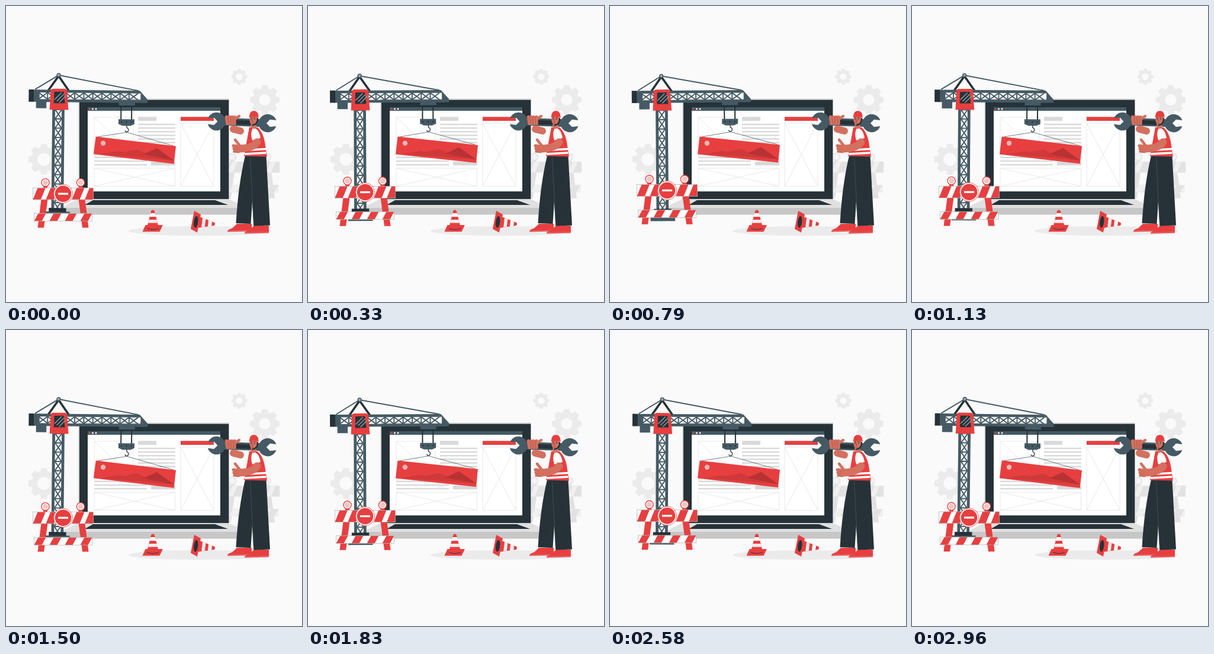
Write an HTML page that moves like this. It is 500x500 px and loops after 3000 ms.

```html
<!DOCTYPE html>
<html lang="en">
<head>
<meta charset="utf-8">
<title>Under construction</title>
<style>
  html, body { margin: 0; width: 100%; height: 100%; overflow: hidden; background: #fafafa; }
  svg { display: block; width: 100vw; height: 100vh; }
</style>
</head>
<body>
<svg id="stage" viewBox="0 0 500 500"></svg>
<script>
const RED = '#e73f40', SLATE = '#455a64', DARK = '#263238', PALE = '#ebebeb',
  GREY = '#d9d9d9', SKIN = '#d4705f', CREASE = '#a84f45', WHITE = '#fff';
const PERIOD = 1500;

// Markup helpers
const rect = (x, y, w, h, fill, extra = '') => `<rect x="${x}" y="${y}" width="${w}" height="${h}" fill="${fill}" ${extra}/>`;
const disc = (x, y, r, fill, extra = '') => `<circle cx="${x}" cy="${y}" r="${r}" fill="${fill}" ${extra}/>`;
const oval = (x, y, rx, ry, fill) => `<ellipse cx="${x}" cy="${y}" rx="${rx}" ry="${ry}" fill="${fill}"/>`;
const shape = (d, fill) => `<path d="${d}" fill="${fill}"/>`;
const line = (d, color, width = 1, cap = 'butt') =>
  `<path d="${d}" fill="none" stroke="${color}" stroke-width="${width}" stroke-linecap="${cap}"/>`;
const limb = (d, width, color = SKIN) => line(d, color, width, 'round');
const repeat = (n, draw) => Array.from({ length: n }, (_, i) => draw(i)).join('');
const place = (transform, content, id = '') => `<g transform="${transform}" id="${id}">${content}</g>`;

function gear(x, y, r, hole) {
  const body = r * 0.8, half = r * 0.2;
  const teeth = repeat(8, i => place(`rotate(${i * 45})`,
    shape(`M${-half * 1.25} ${-r * 0.7}L${-half * 0.9} ${-r}H${half * 0.9}L${half * 1.25} ${-r * 0.7}Z`, PALE)));
  return place(`translate(${x} ${y})`, teeth +
    disc(0, 0, (body + hole) / 2, 'none', `stroke="${PALE}" stroke-width="${body - hole}"`));
}

// Two rails joined by crossed braces
function lattice(bays, bay, depth, rail) {
  const far = depth - rail, length = bays * bay;
  return rect(0, 0, length, rail, SLATE) + rect(0, far, length, rail, SLATE) + repeat(bays, i => {
    const a = i * bay, b = a + bay;
    return line(`M${a} ${rail}V${far}L${b} ${rail}M${a} ${rail}L${b} ${far}`, SLATE, 1.9);
  });
}

function stripedBar(id, w, h, pitch, stripe, slant, base, color, edge) {
  const stripes = repeat(5, i => shape(`M${i * pitch} ${h}l${slant} ${-h}h${stripe}l${-slant} ${h}Z`, color));
  return `<clipPath id="${id}">${rect(0, 0, w, h, base)}</clipPath>` + rect(0, 0, w, h, base) +
    `<g clip-path="url(#${id})">${stripes}</g>` + rect(0, 0, w, h, 'none', `stroke="${edge}" stroke-width=".7"`);
}

function barrier(id, base, color, edge, glow) {
  const leg = shape('M14 19H25L18.5 67.3H8Z', color);
  const lamp = x => rect(x - 3.5, -4, 7, 5, color) + disc(x, -9, 7.3, color) +
    disc(x, -9, 5.9, base) + disc(x, -9, 4.5, glow);
  return leg + place('translate(102) scale(-1 1)', leg) + lamp(21) + lamp(80.5) +
    stripedBar(id + 'Top', 102, 19.8, 21.9, 13.3, 8, base, color, edge) +
    place('translate(2 43)', stripedBar(id + 'Low', 98, 13, 26, 13, 7, base, color, edge));
}

const stopSign = () => disc(51, 10, 16, WHITE, `stroke="${RED}" stroke-width=".8"`) +
  disc(51, 10, 13.8, RED) + rect(42.5, 8.4, 17, 3.2, WHITE);

function backdrop() {
  return gear(394, 119.5, 13.6, 5.6) + gear(437, 158.5, 25, 9.6) + gear(64, 259, 26, 10.8) +
    place('translate(361.5 263) scale(.985 .92)', barrier('far', '#f0f0f0', '#e2e2e2', '#e6e6e6', '#f4f4f4')) +
    oval(328, 380, 121, 8, PALE);
}

function laptop() {
  const crossedBox = (x, y, w, h) =>
    line(`M${x} ${y}h${w}v${h}h${-w}zl${w} ${h}m0 ${-h}l${-w} ${h}`, '#e2e2e2', 0.8);
  const rows = (n, x, y, w) => repeat(n, i => rect(x, y + i * 6.15, w, 2.4, GREY));
  const body = shape('M122 326H376L408 341H92Z', '#e0e0e0') + rect(92, 341, 316, 11.5, '#c7c7c7') +
    rect(122, 156.5, 255, 171, '#d4d8d6') + rect(124, 158.6, 252.3, 167.4, DARK) +
    shape('M147 328H353L375 336H133Z', DARK);
  const screen = rect(138, 171, 224, 142.2, WHITE) + rect(138, 171, 224, 6, SLATE) +
    repeat(3, i => disc(141 + i * 5.5, 174, 1.4, i ? WHITE : RED));
  const page = crossedBox(149, 188, 66, 62) + crossedBox(149, 274, 136.5, 30.5) + crossedBox(295, 198, 56, 106.5) +
    rect(223, 187.3, 31, 6.7, GREY) + rows(6, 223, 198.8, 63) + rows(3, 149, 254.6, 89) +
    rect(245, 263, 41, 6.3, GREY) + rect(295, 187.3, 56, 6.7, RED);
  return body + screen + page;
}

// Tip at the origin, widening downwards
function coneBody() {
  const height = 31, half = y => 2.5 + 8 * y / height;
  const band = (from, to, color) =>
    shape(`M${-half(from)} ${from}H${half(from)}L${half(to)} ${to}H${-half(to)}Z`, color);
  return oval(0, height, half(height), 3, RED) + oval(0, 1, 2.6, 1.5, RED) + band(1, height, RED) +
    band(5, 11, WHITE) + band(16, 21.5, '#f6ecec');
}

function cones() {
  return shape('M235.5 370H265L259.5 381.3H230.5Z', RED) + place('translate(248 345)', coneBody()) +
    line('M238 375.5Q248 379.5 258 375.5', DARK, 0.9) +
    shape('M318 346L329 352L323 382.7L312 376.5Z', RED) +
    place('translate(352.5 368.5) rotate(97)', coneBody() + oval(0, 32, 10, 3.6, DARK));
}

function wrench() {
  const head = shape('M-14.5-5L-4-6.2L2 0L-4 6.2L-14.5 5A15.3 15.3 0 1 0-14.5-5Z', SLATE);
  return place('translate(355.5 195) rotate(2)', rect(10, -6.5, 66, 13, SLATE) +
    rect(22, -3.5, 37, 7.5, DARK, 'rx="2"') + head + place('translate(86.5) rotate(178)', head));
}

function worker() {
  const shoe = shape('M16 0H41V12.5L0 13.5Q-.5 9.5 8 7.5Z', RED) + line('M1 12L41 11', '#f08b8a', 0.6);
  const legs = shape('M404 253H421L413.5 368L388.5 367Q392.5 300 404 253Z', DARK) +
    shape('M411 253H439.5L446 370.5L418.5 371.5Z', DARK) + line('M412.5 256L418.5 371', '#46545b', 0.8);
  const torso = shape('M403 208L413 205L407 229Z', WHITE) +
    shape('M411 205L425 205Q434 213 437 229L441 254.5L402 253.5Z', RED) +
    [241.5, 248].map(y => line(`M403 ${y + 2}L439.5 ${y}`, WHITE, 3.4)).join('') +
    shape('M417 206Q427 206 430 223L416 227Q412 215 417 206Z', WHITE);
  const supportArm = limb('M424 230Q418 240 395 241', 13) + limb('M395 236L387 226', 4.5) +
    repeat(3, i => limb(`M393 ${237 + i * 4.5}L${384 + i} ${236 + i * 4.5}`, 5) +
      line(`M383 ${238.5 + i * 4.2}h8`, CREASE, 0.6));
  const head = limb('M418 196V203', 9) + oval(418.3, 192, 6.9, 9.5, SKIN) +
    line('M425 189Q425.5 201 415.5 201.5', DARK, 2.2) +
    [414.3, 420].map(x => disc(x, 191.2, 0.8, DARK) + line(`M${x - 1.5} 189h3`, DARK, 0.8)).join('') +
    line('M416.8 191L415.5 195h2M414.5 198h4', '#8f3b35', 0.7) +
    shape('M411 187Q411.5 177 418.5 177Q426.5 177.5 426.5 187L428 188.5Q419 186 410 188.5Z', RED);
  const grip = limb('M384 208L396 211', 12) + limb('M386 191L394 186', 4.5) +
    repeat(4, i => limb(`M${372.5 + i * 4.5} 187.5L${374 + i * 4} 198.5`, 5.4)) +
    repeat(3, i => line(`M${375 + i * 4.4} 187L${376.5 + i * 4} 199`, CREASE, 0.7));
  return place('translate(374 368)', shoe) + place('translate(403 371)', shoe) +
    legs + torso + supportArm + wrench() + head + grip;
}

function banner() {
  return line('M155 221L204 213L283 235', '#54626a', 0.8) +
    shape('M151.5 220.5L287 235.5L284 265.5L148 250.5Z', RED) +
    shape('M160 250L190 245L200 246.5L221 241.5L240 250L284.5 260Z', '#cf393a') +
    shape('M232 249.5L255 239L284.5 260Z', '#b83233') + disc(164, 231.7, 4.2, '#f6b5b3');
}

function crane() {
  const boom = place('translate(54 142.4)', lattice(11, 15.3, 20.6, 4.6));
  const mast = place('translate(98.2 160) rotate(90)', lattice(12, 15.7, 20.6, 4.8));
  const base = rect(67.5, 348, 41.5, 14.7, SLATE) + rect(73.3, 342, 29.4, 6.5, DARK);
  const ties = line('M48 142L87.7 117.6L222.5 142.5', SLATE, 1.9) +
    line('M70.5 143.5L87.7 119L105 143.5', DARK, 3.6) +
    disc(87.7, 117.6, 3.6, SLATE) + disc(87.7, 117.6, 2, '#a6afb3');
  const ends = rect(50, 162, 17.5, 11.7, SLATE) + rect(46.3, 142.4, 9.5, 20.6, SLATE) +
    rect(37.5, 142.2, 9, 20.8, DARK) + rect(220, 158.4, 10, 4.6, SLATE) +
    shape('M222 142.4H225L238.5 157.5V163H226.5V147H222Z', SLATE);
  const cab = shape('M78 140.5H99Q101.7 141 102.2 144L104.8 176H73L74.5 144Q75 141 78 140.5Z', RED) +
    shape('M80.5 145.5H96.5L98.8 165H80Z', DARK) +
    repeat(3, i => line(`M${81 + i * 4} ${159 + i * 2.4}l12 -12`, '#87939a', 1.6));
  const hoist = line('M193.7 167V192M211.6 167V192', DARK, 2) + rect(190, 162.5, 27, 5.2, SLATE) +
    shape('M189.5 191H216.5V199L210 202H196L189.5 199Z', SLATE) +
    repeat(3, i => disc(194.5 + i * 8.5, 195.5, 1.2, DARK)) +
    line('M203.5 201V205Q208 207 206 211Q203 214.5 200.5 210', DARK, 1.3);
  return mast + base + ties + boom + ends + cab + banner() + hoist;
}

const stage = document.getElementById('stage');
stage.innerHTML = backdrop() + laptop() + cones() + worker() + place('', crane(), 'crane') +
  place('', barrier('near', WHITE, RED, '#a9adaf', '#f5c4c2') + stopSign(), 'barrier');
const craneGroup = document.getElementById('crane');
const barrierGroup = document.getElementById('barrier');

// Triangle wave: 1 at the start of a period, 0 halfway through
const wave = t => Math.abs(2 * ((t / PERIOD) % 1) - 1);

function render(t) {
  const sway = 2 * wave(t + 150) - 1;
  const lift = 6 * (1 - wave(t));
  craneGroup.setAttribute('transform', `rotate(${sway} 162 239)`);
  barrierGroup.setAttribute('transform', `translate(45.5 ${307.2 - lift})`);
}

const start = performance.now();
function tick() {
  render((performance.now() - start) % (2 * PERIOD));
  requestAnimationFrame(tick);
}
render(0);
requestAnimationFrame(tick);
</script>
</body>
</html>
```
